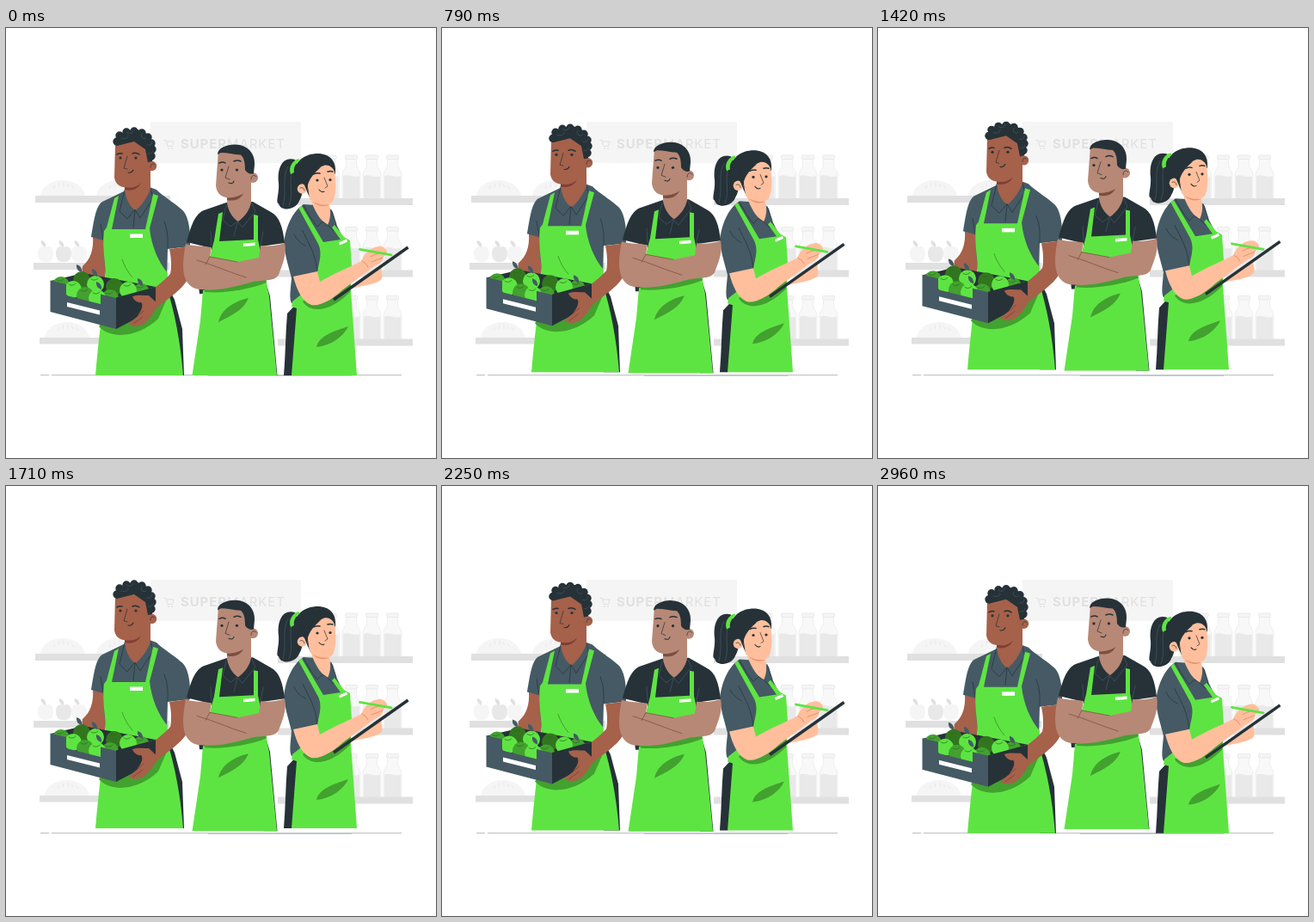
Recreate the animation shown at these times as an HTML page. Size 500 by 500 pixels, loop 3 s.

```html
<!DOCTYPE html>
<html lang="en">
<head>
<meta charset="utf-8">
<title>Supermarket workers</title>
<style>
  html, body { margin: 0; width: 100%; height: 100%; overflow: hidden; background: #fff; }
  svg { display: block; width: 100%; height: 100%; }
  .ln { fill: none; stroke: #263238; stroke-width: .7; stroke-linecap: round; stroke-linejoin: round; }
  .brow { fill: none; stroke: #263238; stroke-width: 1.5; stroke-linecap: round; }
  .ink { fill: #263238; }
  .slate { fill: #455a64; }
  .green { fill: #5ee442; }
  .shade { fill: #42a12f; }
  .white { fill: #fff; }
  .tan { fill: #a5614a; }
  .beige { fill: #b78876; }
  .peach { fill: #ffbf9d; }
  .pale { fill: #f5f5f5; }
  .shelf { fill: #e0e0e0; }
  .sketch { fill: none; stroke: #e6e6e6; stroke-width: .8; }
</style>
</head>
<body>
<svg viewBox="0 0 500 500">
  <defs>
    <g id="bottle">
      <path d="M5 4V11C5 15 .5 18 .5 23V50H21.500V23C21.500 18 17 15 17 11V4Z" fill="#f8f8f8" stroke="#ebebeb" stroke-width=".8"/>
      <path d="M1.500 24C7 21 14 27 20.500 24V50H1.500Z" fill="#e9e9e9"/>
      <rect x="4" width="14" height="4.500" rx="1" fill="#f5f5f5" stroke="#e6e6e6" stroke-width=".8"/>
    </g>
    <g id="loaf">
      <path class="pale" d="M0 18C1 8 12 0 26 0S50 8 52 18Z"/>
      <path class="sketch" d="M15 10L17 6M21 8L22 3M27 8L27 2M33 8L31 4M39 10L36 6"/>
    </g>
    <g id="pale-apple">
      <path d="M9 2C4-1 0 3 0 9C0 16 4 20 9 19C14 20 18 16 18 9C18 3 14-1 9 2Z"/>
      <path d="M9 2C4 0 3-4 4-6C8-5 10-2 9 2Z" fill="#e0e0e0"/>
    </g>
  </defs>

  <g id="store">
    <rect class="pale" x="168" y="109" width="175" height="48"/>
    <path d="M183.500 130.500H186L188 137.500H193.500L195 132H187" fill="none" stroke="#e0e0e0"/>
    <circle cx="189" cy="140" r="1" fill="#e0e0e0"/><circle cx="193" cy="140" r="1" fill="#e0e0e0"/>
    <text x="203" y="140" font-family="Inter, 'Open Sans', sans-serif" font-size="15" letter-spacing=".9" fill="#e0e0e0"><tspan font-weight="700">SUPER</tspan><tspan>MARKET</tspan></text>
    <use href="#loaf" x="40" y="177"/><use href="#loaf" x="105" y="177"/><use href="#loaf" x="45" y="342"/>
    <g class="pale">
      <use href="#pale-apple" x="37" y="253"/><use href="#pale-apple" x="76" y="253"/>
      <use href="#pale-apple" x="58" y="253" fill="#e8e8e8"/>
    </g>
    <g id="bottles"></g>
    <g class="shelf">
      <rect x="34" y="195" width="157" height="8"/><rect x="32" y="273" width="158" height="8"/><rect x="39" y="360" width="150" height="7.500"/>
      <rect x="316" y="198" width="157" height="8"/><rect x="316" y="281.500" width="157" height="8"/><rect x="316" y="361.500" width="157" height="8"/>
    </g>
  </g>

  <path d="M40 403.600H50M53 403.600H460" stroke="#263238" stroke-width=".5" opacity=".65"/>
  <path d="M235 404.400H402" stroke="#263238" stroke-width=".5" opacity=".5"/>

  <g id="carrier">
    <path class="ink" d="M188 300L196 316L205 350L207 404H188Z"/>
    <path class="tan" d="M101 243L115 247V290L87 292L89 277C98 269 102 258 101 243Z"/>
    <path class="slate" d="M139 189L112 202C104 207 102 226 99 243L113 247L116 295H187L188 257L214 254C215 234 212 216 203 210C194 202 183 196 175 188L167 185Z"/>
    <path class="tan" d="M138 165V187C139 201 146 210 151 212C158 206 164 197 168 188V160Z"/>
    <path class="ln" d="M138 188L132 213L141 222L150 211L156 221L171 198L168 187M150 212L148 232M184 225C189 238 188 247 188 256M110 228L113 246"/>
    <path d="M138 184C144 187 151 186 157 180C153 188 145 190 138 188Z" fill="#7f3f33"/>
    <path class="tan" d="M127 135L126 174C128 187 143 188 152 182C161 178 167 171 168 165L171 138L150 127Z"/>
    <circle class="tan" cx="169.500" cy="160.500" r="5.700"/>
    <path class="ln" d="M168 162C168 158 171 157 173 159"/>
    <g id="curls" class="ink"></g>
    <path class="ink" d="M126 134C128 124 140 118 150 118C162 118 171 128 173 142L170 155L165 156L162 141L149 132L129 137Z"/>
    <path class="ln" style="stroke:#455a64" d="M140 121C144 124 147 122 148 119M158 123C155 128 161 130 163 128M134 128C139 130 143 127 142 125M164 136C168 137 170 135 170 132M165 146C168 147 170 145 171 143"/>
    <path class="brow" d="M129 147Q132 145 135 146M147 146Q151 144 155 147"/>
    <circle class="ink" cx="133" cy="151" r="1.600"/><circle class="ink" cx="151" cy="151" r="1.600"/>
    <path class="ln" d="M141 149L137 163L141 164"/><path class="ln" style="stroke-width:1.100" d="M142 168Q146 169 148 165"/>
    <path class="green" d="M126 198L131 195L123 234H162L171 193L177 195L167 233C169 253 177 272 188 285L187 302C196 330 203 365 206 404H104C106 380 108 362 110 345L116 300C117 275 111 258 114 236L117 232Z"/>
    <rect class="white" x="144" y="239.500" width="15" height="4.500"/>
    <path class="ln" style="stroke:#318122" d="M135 269Q139 281 147 290"/>
    <path class="shade" d="M108 347C124 364 156 358 177 338L190 308L120 330Z"/>
    <path class="tan" d="M190 257L213 254C211 268 214 280 211 292C207 302 190 314 174 326L161 311C173 302 183 295 191 286C193 278 192 266 190 257Z"/>
    <path class="ink" d="M52 294L90 285L174 301L128 314L110 322L70 312Z"/>
    <g id="apples"></g>
    <path class="slate" d="M51.500 293.500L70 298V311L110 321V309.500L128 314V350L51.500 330Z"/>
    <path class="ink" d="M128 313.500L174 301V326L128 350Z"/>
    <path class="white" d="M71 319L109 328.500V333.500L71 324Z"/>
    <path class="tan" d="M147 312C153 310 160 311 166 311L178 322C171 330 167 341 158 345C152 348 146 347 142 344L152 336C158 328 160 322 157 319C153 320 148 316 147 312Z"/>
    <path class="ln" style="stroke:#753b2f" d="M152 336L160 329M148 344L159 336"/>
  </g>

  <g id="writer">
    <path class="ink" d="M327 332L342 316L333 404H323C325 380 325 355 327 332Z"/>
    <path class="ink" d="M336 153C322 149 315 162 317 180C318 193 313 203 317 204C319 214 337 212 341 201C347 192 343 183 345 173Z"/>
    <path class="ln" style="stroke:#455a64" d="M328 161C320 174 327 190 322 207M333 165C328 181 335 192 329 207"/>
    <path class="slate" d="M346 205C333 213 325 232 323 251C325 268 329 278 332 291C331 303 329 315 332 320L342 318L368 300L399 250L391 242L384 228L380 214L374 207Z"/>
    <path class="peach" d="M352 190L356 204C361 217 367 225 374 229C378 221 378 211 375 202Z"/>
    <path class="ln" d="M346 206L355 222L362 231L368 225L374 229L381 236L384 228L378 211M345 236C353 253 360 262 362 284M335 240C338 246 343 251 348 253"/>
    <path d="M357 202C363 208 370 208 375 206L359 199Z" fill="#ee8e69"/>
    <path class="ink" d="M334 172C335 153 350 145 365 146C379 148 384 156 383 169L377 176L354 199L347 184Z"/>
    <path class="peach" d="M350 178C354 170 359 166 367 161C373 157 380 161 382 167C384 180 384 194 380 202C373 209 360 205 353 199Z"/>
    <circle class="peach" cx="344.500" cy="187" r="5.800"/><path class="ln" d="M342 186Q346 184 347 189"/>
    <path class="ink" d="M344 180C349 183 348 188 350 189C350 180 355 171 366 162L347 166Z"/>
    <path class="green" d="M340 152C333 154 328 162 331 170L335 168C334 162 337 157 342 154Z"/>
    <path class="brow" d="M358 170Q361 168 365 169M374 167Q377 166 380 167"/>
    <circle class="ink" cx="362" cy="177" r="1.600"/><circle class="ink" cx="377" cy="176.500" r="1.600"/>
    <path class="ln" d="M370 174L374 184L371 186"/><path class="ln" style="stroke-width:1.100" d="M364 188Q367 192 370 190"/>
    <path class="green" d="M340 209L344 207L369 249L389 246L379 232L382 229L393 243L400 247L402 277L401 305L408 404H332L338 326L332 324L333 318L362 295C360 278 370 266 363 251Z"/>
    <path class="white" d="M387 249.500L396 245.500L397 248.500L388 252.500Z"/>
    <path class="shade" d="M345 318C355 334 380 328 400 307L401 290L360 305Z"/>
    <path class="shade" d="M361 371C364 358 380 353 398 347C392 359 379 369 361 371Z"/>
    <path class="peach" d="M334 289L362 283L365 295C382 285 398 279 413 271C417 262 424 255 433 254C438 253 440 256 442 258C445 261 441 264 438 267C440 272 432 275 427 278L392 304C380 315 366 324 355 322C344 318 338 304 334 289Z"/>
    <path class="peach" d="M401 303L437 276C435 283 440 288 436 293C427 299 412 300 401 303Z"/>
    <path class="ln" style="stroke:#d97d5c" d="M424 266Q432 260 441 263M425 272L438 267M414 271Q419 273 421 278"/>
    <path d="M411.500 257.500L448 264" stroke="#5ee442" stroke-width="2.800" stroke-linecap="round"/>
    <path d="M381 316L467.500 255" stroke="#263238" stroke-width="3.500"/>
  </g>

  <g id="leader">
    <path class="ink" d="M300 288L307 312L315.500 404H300ZM224 300H234L229 309H225Z"/>
    <path class="ink" d="M256 203L230 212C218 217 214 235 210 249L239 256V275H296V254L324 250C322 232 318 219 308 214L287 202Z"/>
    <path class="beige" d="M257 188V204C259 215 265 222 270 225C278 219 283 212 285 203V175Z"/>
    <path class="ln" style="stroke:#455a64" d="M256 206L252 223L261 231L269 225L275 232L290 213L286 204M269 226L265 242M238 236L239 252M299 237L296 252"/>
    <path d="M257 196C266 198 273 195 277 190C274 199 266 202 257 200Z" fill="#7d4d40"/>
    <path class="beige" d="M247 143L244 183C245 196 257 200 267 196C277 194 283 187 285 180L284 148L265 139Z"/>
    <circle class="beige" cx="287" cy="174" r="6"/><path class="ln" d="M285 176C285 171 289 170 291 173"/>
    <path class="ink" d="M246 147C246 139 258 135 267 135.500C281 136 290 146 289 159L288 169C284 171 280 168 278 165C278 157 277 151 273 147.500C265 147 257 145 250 145Z"/>
    <path class="brow" d="M248 157Q252 155 255 157M265 155Q269 153 273 155"/>
    <circle class="ink" cx="251" cy="165" r="1.600"/><circle class="ink" cx="268.500" cy="165" r="1.600"/>
    <path class="ln" d="M259 161L255 174L260 176"/><path class="ln" style="stroke-width:1.100" d="M259 180Q264 182 265 178"/>
    <path class="green" d="M247 216L252 214L248 248L288 246V217L293 218V246L298 270L270 278L236 270L242 247Z"/>
    <path class="white" d="M276 250.500L289.500 249.500V253L276 254Z"/>
    <path class="green" d="M229 305L302 292L306 312L315 404H216.500L226 340Z"/>
    <path class="shade" d="M231 303L302 291L303 296C283 304 254 309 231 307Z"/>
    <path class="shade" d="M247 342C250 328 264 318 282 314C276 328 263 334 247 342Z"/>
    <path class="beige" d="M209 251C217 254 229 253 239 255L237 266L269 272L294 267L296 253C306 254 316 253 324 250C327 263 321 276 317 287C312 296 296 292 284 296C266 301 246 306 226 304C205 302 203 281 209 251Z"/>
    <path class="ln" style="stroke:#79483b" d="M237 266L232 275M222 270C240 275 262 285 279 290M237 266L269 272"/>
  </g>
</svg>
<script>
const LOOP = 3000, LIFT = 7;
const el = id => document.getElementById(id);
const circle = (x, y, r, extra = '') => `<circle cx="${x}" cy="${y}" r="${r}" ${extra}/>`;

el('bottles').innerHTML = [148, 231.5, 311.5].map(y =>
  [366, 390.5, 414.5, 438.5].map(x => `<use href="#bottle" x="${x}" y="${y}"/>`).join('')).join('');

// Hair curls follow the upper outline of the head.
el('curls').innerHTML = [[129, 132], [132, 125], [140, 121], [149, 120], [158, 122], [165, 127], [169, 134], [170, 141], [169, 149]]
  .map(([x, y]) => circle(x, y, 4.7)).join('');

const fruit = (x, y, color) => circle(x, y, 10, `fill="${color}"`) +
  `<path class="ln" style="stroke:#2b6b1d" d="M${x - 5} ${y - 6}q4 3 8-1"/>`;
const leaf = (x, y) => `<path d="M${x} ${y}q-7-2-6-9q7 2 6 9Z" fill="#455a64"/>`;
const LIGHT = '#5ee442', MID = '#42a12f', DARK = '#32751f';
el('apples').innerHTML = [
  [88, 293, DARK], [64, 299, MID], [104, 298, LIGHT], [126, 301, DARK], [157, 307, MID],
  [142, 305, LIGHT], [78, 304, LIGHT], [121, 314, MID], [92, 311, MID], [106, 314, LIGHT]
].map(a => fruit(...a)).join('') + leaf(88, 284) + leaf(106, 289) + leaf(111, 304) + leaf(159, 300);

// Linear rise and fall, resting until the delay has passed.
function float(t, period, delay = 0) {
  if (t < delay) return 0;
  const p = (t - delay) % period / period;
  return -LIFT * (1 - Math.abs(2 * p - 1));
}

function render(t) {
  const shift = (id, y) => el(id).setAttribute('transform', `translate(0 ${y.toFixed(3)})`);
  shift('carrier', float(t, 3000));
  shift('writer', float(t, 3000));
  shift('leader', float(t, 1500, 500));
}

const start = performance.now();
function tick(now) {
  render(Math.max(0, now - start) % LOOP);
  requestAnimationFrame(tick);
}
render(0);
requestAnimationFrame(tick);
</script>
</body>
</html>
```
